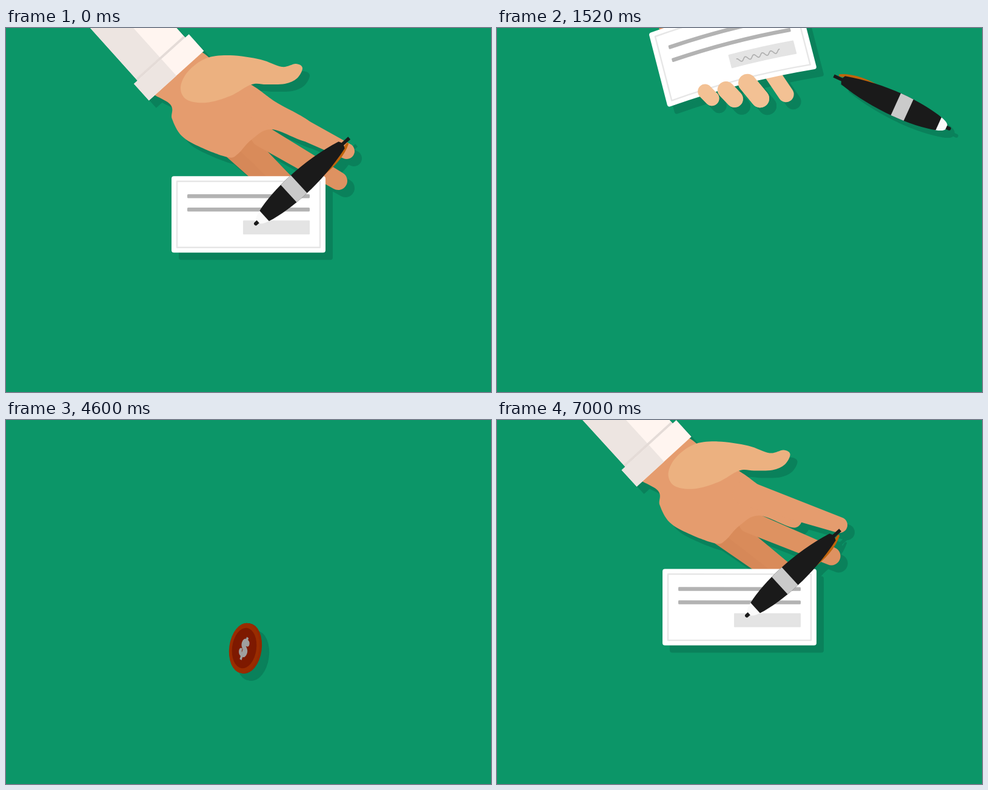
An HTML page with a canvas that plays this animation: 800 by 600 pixels, repeating every 7.04 s.

```html
<!DOCTYPE html>
<html lang="en">
<head>
<meta charset="utf-8">
<title>Cheque and chip</title>
<style>
html, body { margin: 0; width: 100%; height: 100%; overflow: hidden; background: #0c9668; }
canvas { display: block; width: 800px; height: 600px; }
</style>
</head>
<body>
<canvas id="stage" width="800" height="600"></canvas>
<script>
const ctx = document.getElementById('stage').getContext('2d');
const LOOP = 7040, STEP = 40, RAD = Math.PI / 180;
const SHADOW = '#0a815b';
let flat = null; // set while the shadow layer is painted

const ink = c => flat || c;
const clamp = x => Math.max(0, Math.min(1, x));
const lerp = (a, b, k) => a + (b - a) * k;
const mix = (a, b, k) => a.map((v, i) => lerp(v, b[i], k));
const rgb = c => `rgb(${c.map(v => Math.round(Math.max(0, Math.min(255, v)))).join(',')})`;
const smooth = (t, a, b) => { const k = clamp((t - a) / (b - a)); return k * k * (3 - 2 * k); };

// Hermite spline through rows of [time, ...values]
function spline(keys, t) {
  const last = keys.length - 1;
  if (t <= keys[0][0]) return keys[0].slice(1);
  if (t >= keys[last][0]) return keys[last].slice(1);
  let i = 0;
  while (t > keys[i + 1][0]) i++;
  const a = keys[i], b = keys[i + 1], h = b[0] - a[0], s = (t - a[0]) / h;
  const slope = (j, n) => j === 0 || j === last ? 0 :
    (keys[j + 1][n] - keys[j - 1][n]) / (keys[j + 1][0] - keys[j - 1][0]);
  return a.slice(1).map((v, m) => {
    const n = m + 1, s2 = s * s, s3 = s2 * s;
    return v * (2 * s3 - 3 * s2 + 1) + b[n] * (3 * s2 - 2 * s3) +
      h * (slope(i, n) * (s3 - 2 * s2 + s) + slope(i + 1, n) * (s3 - s2));
  });
}

function blob(pts, color) {
  const n = pts.length, at = i => pts[(i + n) % n];
  ctx.beginPath();
  ctx.moveTo(...pts[0]);
  for (let i = 0; i < n; i++) {
    const [p, a, b, q] = [at(i - 1), at(i), at(i + 1), at(i + 2)];
    ctx.bezierCurveTo(a[0] + (b[0] - p[0]) / 6, a[1] + (b[1] - p[1]) / 6,
      b[0] - (q[0] - a[0]) / 6, b[1] - (q[1] - a[1]) / 6, b[0], b[1]);
  }
  ctx.fillStyle = ink(color);
  ctx.fill();
}

function taper(a, b, ra, rb, color) {
  const dir = Math.atan2(b[1] - a[1], b[0] - a[0]), q = Math.PI / 2;
  ctx.beginPath();
  ctx.arc(b[0], b[1], rb, dir - q, dir + q);
  ctx.arc(a[0], a[1], ra, dir + q, dir + 3 * q);
  ctx.closePath();
  ctx.fillStyle = ink(color);
  ctx.fill();
}

/* ---------- hand ---------- */
const PALM_OPEN = [[230,92],[271,126],[274,150],[290,178],[322,197],[366,213],[382,208],
  [405,184],[438,167],[497,187],[505,158],[445,122],[410,97],[350,60],[305,38]];
const PALM_HOLD = [[290,165],[280,186],[268,218],[269,255],[283,300],[305,325],[330,335],
  [355,340],[395,338],[420,350],[425,320],[415,260],[410,212],[367,155],[340,112]];
const THUMB_OPEN = [[288,98],[300,72],[330,50],[370,45],[420,52],[455,64],[478,59],
  [489,66],[480,83],[460,92],[430,93],[405,93],[370,112],[330,123],[298,118]];
const THUMB_HOLD = [[318,187],[328,165],[352,151],[395,149],[440,166],[485,193],[510,192],
  [522,200],[512,218],[490,224],[455,212],[427,208],[400,219],[360,219],[328,208]];
// open, hold and grip: base and tip of each finger; r: radii
const FINGERS = [
  { open: [[372,201],[440,264]], hold: [[300,290],[309,411]], grip: [[339,353],[347,367]], r: [14,12] },
  { open: [[398,192],[474,268]], hold: [[334,290],[353,438]], grip: [[373,359],[383,377]], r: [16,14] },
  { open: [[422,178],[548,252]], hold: [[366,290],[399,452]], grip: [[410,357],[424,387]], r: [18,15] },
  { open: [[415,130],[562,203]], hold: [[402,300],[441,428]], grip: [[451,346],[467,391]], r: [21,13] }
];
const LIGHT = [243,193,148], THUMB = [236,177,128], PAD = [229,163,117];

// swings a finger about its base instead of sliding the tip
function swing(f, p) {
  const polar = ([a, b]) => [Math.atan2(b[1] - a[1], b[0] - a[0]), Math.hypot(b[0] - a[0], b[1] - a[1])];
  const k = Math.max(0, p), a = mix(f.open[0], f.hold[0], k);
  const [a0, l0] = polar(f.open), [a1, l1] = polar(f.hold);
  const ang = lerp(a0, a1, p), len = lerp(l0, l1, k);
  return [a, [a[0] + len * Math.cos(ang), a[1] + len * Math.sin(ang)]];
}

function sleeve(p) {
  const k = Math.max(0, p);
  ctx.save();
  ctx.translate(lerp(211, 248, k), lerp(92, 159, k));
  ctx.rotate(lerp(-42, -39.7, p) * RAD);
  const box = (x, y, w, h, c) => { ctx.fillStyle = ink(c); ctx.fillRect(x, y, w, h); };
  box(8, -460, 106, 461, '#fff5f0');
  box(8, -460, 53, 461, '#ede5e1');
  box(8, -4, 106, 4, '#e4dbd7');
  box(0, 0, 122, 37, '#fff5f0');
  box(0, 0, 61, 37, '#ede5e1');
  ctx.restore();
}

function handState(t) {
  const tau = t > 6000 ? t - LOOP : t;
  const raw = (1 - Math.exp(-tau / 300)) / (1 - Math.exp(-2));
  const p = Math.max(-0.17, Math.min(1.03, raw));
  const away = Math.min(0, raw + 0.17), lift = Math.min(0, p);
  return { p, dx: away * 130 + lift * 33, dy: away * 150 + lift * 58,
    curl: t < 6000 ? smooth(t, 720, 980) : 0, wrap: t < 6000 ? smooth(t, 860, 1100) : 0 };
}

function hand(s) {
  const k = clamp(s.p);
  const morph = (a, b) => a.map((v, i) => mix(v, b[i], Math.max(0, s.p)));
  const palm = mix([229,156,110], [223,145,96], k);
  ctx.save();
  ctx.translate(s.dx, s.dy);
  const finger = (f, i) => {
    const [a, b] = swing(f, s.p).map((v, j) => mix(v, f.grip[j], s.curl));
    const base = i === 3 ? palm : mix([[214,136,88],[217,139,90],[222,146,97]][i], [223,145,96], k);
    const color = mix(base, LIGHT, s.curl);
    taper(a, b, lerp(f.r[0], f.r[1], s.curl), f.r[1], rgb(color));
    if (!flat) {
      ctx.globalAlpha = k * (1 - s.curl);
      taper(mix(a, b, 0.8), b, f.r[1], f.r[1] - 0.3, rgb(PAD));
      ctx.globalAlpha = 1;
    }
  };
  FINGERS.slice(0, 3).forEach(finger);
  ctx.save();
  ctx.translate(25 * s.curl, 0);
  blob(morph(PALM_OPEN, PALM_HOLD), rgb(palm));
  ctx.restore();
  finger(FINGERS[3], 3);
  ctx.save();
  ctx.translate(25 * s.curl, 0);
  blob(morph(THUMB_OPEN, THUMB_HOLD), rgb(THUMB));
  sleeve(s.p);
  ctx.restore();
  ctx.restore();
}

function wrappedTips(s) {
  if (!s.wrap) return;
  for (const f of FINGERS.slice(0, 3)) {
    const low = mix(f.hold[1], f.grip[1], s.curl);
    taper(mix(low, f.grip[0], s.wrap), low, f.r[1], f.r[1], rgb(mix(PAD, LIGHT, s.curl)));
  }
}

/* ---------- cheque, centred on its own origin ---------- */
function cheque(bend, signed) {
  const K = 127 * 127;
  const f = x => -bend * (1 - x * x / K);
  const slab = (x0, y0, x1, y1) => {
    const c = -bend + bend * x0 * x1 / K, m = (x0 + x1) / 2;
    ctx.beginPath();
    ctx.moveTo(x0, y0 + f(x0));
    ctx.quadraticCurveTo(m, y0 + c, x1, y0 + f(x1));
    ctx.lineTo(x1, y1 + f(x1));
    ctx.quadraticCurveTo(m, y1 + c, x0, y1 + f(x0));
    ctx.closePath();
  };
  const plate = (x0, y0, x1, y1, r, color) => {
    slab(x0 + r, y0 + r, x1 - r, y1 - r);
    ctx.fillStyle = ctx.strokeStyle = ink(color);
    ctx.lineWidth = 2 * r;
    ctx.fill();
    ctx.stroke();
  };
  ctx.lineJoin = ctx.lineCap = 'round';
  plate(-127, -63, 127, 63, 4, '#fff');
  if (flat) return;
  slab(-118, -54.5, 118, 54.5);
  ctx.strokeStyle = '#e6e6e6';
  ctx.lineWidth = 2.4;
  ctx.stroke();
  plate(-101, -33.2, 101, -26.8, 1.5, '#b3b3b3');
  plate(-101, -11.2, 101, -4.8, 1.5, '#b3b3b3');
  plate(-9, 10, 101, 33, 1, '#e4e4e4');
  if (signed > 0) {
    ctx.beginPath();
    for (let x = 0; x <= 72 * signed; x++)
      ctx.lineTo(3 + x, 23 - 3 * Math.cos(x / 14.4 * 2 * Math.PI) + f(3 + x));
    ctx.strokeStyle = '#b0b0b0';
    ctx.lineWidth = 1.7;
    ctx.stroke();
  }
}

/* ---------- pen ---------- */
const PEN_PATH = [[0,488,253,-42.5],[160,489,253,-42.8],[600,527,249,-50.8],[830,544,246,-52],
  [1520,652,123,-155.5],[1620,658,112,-172],[2200,178,86,-258],[2440,140,-135,-290]];

function penState(t) {
  if (t > 6200) {
    const e = 1 - (1 - clamp((t - 6200) / 700)) ** 3;
    return { x: lerp(520, 488, e), y: lerp(730, 253, e), a: lerp(60, -42.5, e), roll: -0.88 };
  }
  if (t >= 2440) return null;
  const [x, y, a] = spline(PEN_PATH, t);
  return { x, y, a, roll: -0.88 + 1.88 * (smooth(t, 150, 560) - smooth(t, 850, 1300)) };
}

function pen({ x, y, a, roll }) {
  const fill = c => { ctx.fillStyle = ink(c); ctx.fill(); };
  const clip = () => {
    ctx.save();
    ctx.scale(1, -roll);
    ctx.beginPath();
    ctx.moveTo(131, 18);
    ctx.quadraticCurveTo(178, 24, 205, 7);
    ctx.quadraticCurveTo(206, 2, 198, 5);
    ctx.quadraticCurveTo(172, 12, 131, 18);
    fill('#c0640c');
    ctx.restore();
  };
  const body = () => {
    ctx.beginPath();
    ctx.moveTo(22, -11.5);
    ctx.bezierCurveTo(60, -22, 130, -24.5, 195, -7.5);
    ctx.quadraticCurveTo(200, 0, 195, 7.5);
    ctx.bezierCurveTo(130, 24.5, 60, 22, 22, 11.5);
    ctx.closePath();
  };
  ctx.save();
  ctx.translate(x, y);
  ctx.rotate(a * RAD);
  ctx.translate(-106, 0);
  ctx.lineCap = 'round';
  ctx.strokeStyle = ink('#1a1a1a');
  ctx.lineWidth = 6;
  ctx.beginPath();
  ctx.moveTo(3, 0);
  ctx.lineTo(9, 0);
  ctx.stroke();
  ctx.fillStyle = ink('#1a1a1a');
  ctx.fillRect(194, -2.8, 18, 5.6);
  ctx.beginPath();
  ctx.moveTo(8, -4);
  ctx.quadraticCurveTo(10, -8.5, 24, -12);
  ctx.lineTo(24, 12);
  ctx.quadraticCurveTo(10, 8.5, 8, 4);
  fill('#fafafa');
  if (roll < 0) clip();
  body();
  fill('#1a1a1a');
  ctx.save();
  body();
  ctx.clip();
  ctx.fillStyle = ink('#cacaca');
  ctx.fillRect(76.5, -24, 23, 48);
  ctx.restore();
  if (roll >= 0) clip();
  ctx.restore();
}

/* ---------- chip: a disc in space seen from 25 degrees above ---------- */
const CHIP_PATH = [[3560,850,225],[3900,690,325],[4280,535,372],[4480,410,377],[4600,393,376],
  [5000,397,380],[5760,400,393.5]];
const CHIP_TURN = [[3600,95,80],[4280,100,78],[4600,148,69.5],[5100,500,42],[5760,900,0]];

function chip(t) {
  let [x, y] = spline(CHIP_PATH, t);
  let [turn, tilt] = spline(CHIP_TURN, t);
  if (t > 6020) {
    const e = (t - 6020) / 260;
    y -= 460 * e * e;
    tilt += 180 * e;
  }
  const se = 0.42, ce = 0.907, R = 41.5;
  const rim = [235,67,0], edge = [168,32,0];
  const ct = Math.cos(tilt * RAD), st = Math.sin(tilt * RAD);
  const cp = Math.cos(turn * RAD), sp = Math.sin(turn * RAD);
  let n = [st * cp, st * sp * se - ct * ce, st * sp * ce + ct * se];
  let right = [sp, -cp * se];
  const down = [ct * cp, ct * sp * se + st * ce];
  if (n[2] < 0) {
    n = n.map(v => -v);
    right = right.map(v => -v);
  }
  const lit = 0.65 + 0.35 * clamp((0.7 * n[0] - 0.6 * n[1] + 0.5 * n[2]) / 0.75);
  const tone = c => rgb(c.map(v => v * lit));
  const disc = (r, shift, c) => {
    ctx.beginPath();
    ctx.ellipse(x + n[0] * shift, y + n[1] * shift, Math.max(0.5, r * n[2]), r,
      Math.atan2(n[1], n[0]), 0, 2 * Math.PI);
    ctx.fillStyle = ink(c);
    ctx.fill();
  };
  const side = tone(mix(rim, edge, clamp(-n[1])));
  for (let d = -5; d < 0; d++) disc(R, d, side);
  disc(R, 0, tone(rim));
  if (flat) return;
  disc(33.5, 0, tone([194,39,0]));
  ctx.save();
  ctx.transform(right[0], right[1], down[0], down[1], x, y);
  ctx.rotate(Math.max(0, x - 400) / R);
  ctx.font = 'bold 43px "Noto Serif", "Liberation Serif", serif';
  ctx.textAlign = 'center';
  ctx.lineJoin = 'miter';
  ctx.fillStyle = ctx.strokeStyle = tone([245,245,245]);
  ctx.lineWidth = 3.4;
  ctx.fillText('$', 0, 15.3);
  ctx.strokeText('$', 0, 15.3);
  ctx.restore();
}

/* ---------- scene ---------- */
function chequeState(t) {
  if (t > 6000) {
    const off = 7.2 * Math.exp((LOOP - t) / 230);
    return { x: 400, y: 300 + off, a: 28 * (off / 360) ** 2, bend: 0 };
  }
  const u = Math.max(0, (t - 1000) / 520), e = u * u;
  return { x: 400 - 11 * e, y: 300 + 7.2 * Math.exp(-t / 230) - 262 * e, a: -14.5 * Math.min(e, 1.3),
    bend: 6 * Math.min(e, 1.2) };
}

function things(t) {
  const paper = t < 1900 || t > 6100;
  if (t >= 3600 && t < 6320) chip(t);
  if (paper) {
    const c = chequeState(t), h = handState(t);
    const held = draw => {
      ctx.save();
      if (t > 1000 && t < 6000) {
        ctx.translate(c.x, c.y);
        ctx.rotate(c.a * RAD);
        ctx.translate(-400, -300);
      }
      draw(h);
      ctx.restore();
    };
    if (t < 1900 || t > 6480) held(hand);
    ctx.save();
    ctx.translate(c.x, c.y);
    ctx.rotate(c.a * RAD);
    cheque(c.bend, t < 6000 ? clamp((t - 200) / 720) : 0);
    ctx.restore();
    held(wrappedTips);
  }
  const p = penState(t);
  if (p) pen(p);
}

function paint(t) {
  ctx.fillStyle = '#0c9668';
  ctx.fillRect(0, 0, 800, 600);
  flat = SHADOW;
  ctx.save();
  ctx.translate(12, 12);
  things(t);
  ctx.restore();
  flat = null;
  things(t);
}

const start = performance.now();
function tick() {
  const t = (performance.now() - start) % LOOP;
  paint(Math.floor(t / STEP) * STEP);
  requestAnimationFrame(tick);
}
tick();
</script>
</body>
</html>
```
